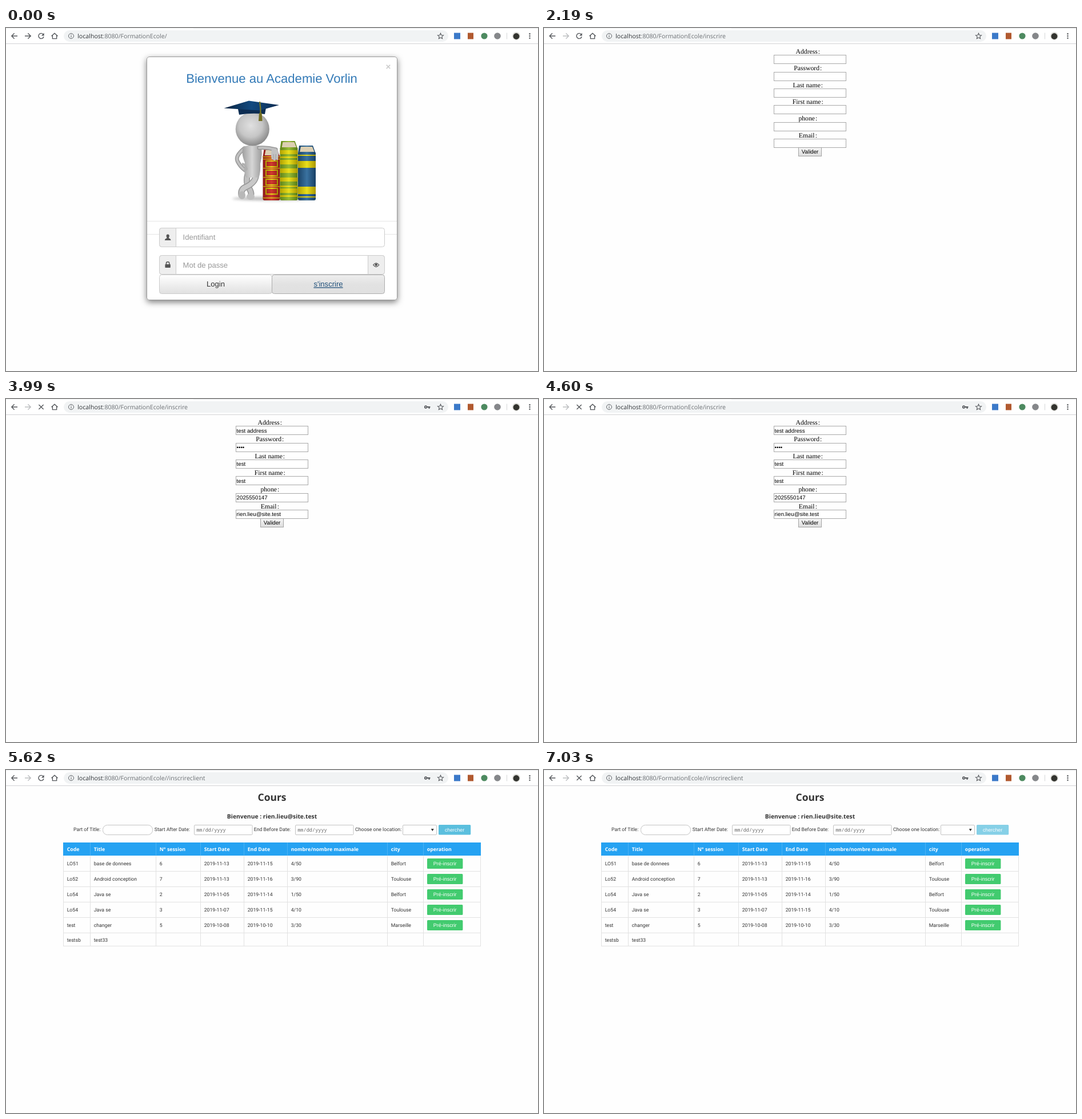
Recreate the animation shown at these times as an HTML page. Size 931 px wide and 601 px high, loop 8 s.

```html
<!DOCTYPE html>
<html lang="fr">
<head>
<meta charset="utf-8">
<title>Inscription</title>
<style>
html, body { margin: 0; width: 100%; height: 100%; overflow: hidden; background: #fefefe; }
svg { display: block; width: 931px; height: 601px; text-rendering: geometricPrecision; }
.ui { font-family: "Open Sans", "Noto Sans", sans-serif; }
.cell { font-family: Roboto, "Open Sans", sans-serif; }
.arial { font-family: "Liberation Sans", Arial, sans-serif; }
.times { font-family: "Liberation Serif", "Times New Roman", serif; }
.mono { font-family: "Noto Sans Mono", monospace; }
.bold { font-weight: 700; }
.mid { text-anchor: middle; }
</style>
</head>
<body>
<svg id="stage" viewBox="0 0 931 601" xmlns="http://www.w3.org/2000/svg"></svg>
<script>
const LOOP = 8000;
const stage = document.getElementById('stage');

const text = (x, y, size, cls, fill, str, extra = '') =>
  `<text x="${x}" y="${y}" font-size="${size}" class="${cls}" fill="${fill}" ${extra}>${str}</text>`;
const rect = (x, y, w, h, fill, stroke = 'none', r = 0, extra = '') =>
  `<rect x="${x}" y="${y}" width="${w}" height="${h}" fill="${fill}" stroke="${stroke}" rx="${r}" ${extra}/>`;
const path = (d, fill, stroke = 'none', width = 1, extra = '') =>
  `<path d="${d}" fill="${fill}" stroke="${stroke}" stroke-width="${width}" ${extra}/>`;
const dot = (x, y, r, fill) => `<circle cx="${x}" cy="${y}" r="${r}" fill="${fill}"/>`;
const oval = (x, y, rx, ry, fill, extra = '') =>
  `<ellipse cx="${x}" cy="${y}" rx="${rx}" ry="${ry}" fill="${fill}" ${extra}/>`;
const group = (id, body) => `<g id="${id}">${body}</g>`;
const gradient = (id, stops, dir = 'x2="0" y2="1"') =>
  `<linearGradient id="${id}" ${dir}>` +
  stops.map((c, i) => `<stop offset="${i / (stops.length - 1)}" stop-color="${c}"/>`).join('') +
  '</linearGradient>';

function defs() {
  const across = 'x2="1" y2="0"';
  return '<defs>' +
    gradient('btn', ['#ffffff', '#e0e0e0']) +
    gradient('btnOn', ['#eeeeee', '#e2e2e2', '#e0e0e0']) +
    gradient('native', ['#f6f6f6', '#dddddd']) +
    gradient('cap', ['#0b2440', '#124a80', '#0b2b50'], across) +
    gradient('gold', ['#b3a200', '#eadf1c', '#a89600'], across) +
    gradient('red', ['#8c1b1b', '#cf3a2e', '#8a1717'], across) +
    gradient('green', ['#5f8419', '#98bd36', '#557a14'], across) +
    gradient('blue', ['#1b4468', '#3a72a0', '#173f64'], across) +
    gradient('limb', ['#a0a0a0', '#d6d6d6', '#9a9a9a'], across) +
    '<radialGradient id="head" cx=".45" cy=".4" r=".62"><stop offset="0" stop-color="#e0e0e0"/>' +
    '<stop offset=".55" stop-color="#c6c6c6"/><stop offset="1" stop-color="#858585"/></radialGradient>' +
    '<filter id="shadow" x="-10%" y="-10%" width="120%" height="120%">' +
    '<feDropShadow dx="0" dy="3.6" stdDeviation="5.2" flood-opacity=".5"/></filter>' +
    '<filter id="soft" x="-20%" y="-100%" width="140%" height="300%"><feGaussianBlur stdDeviation="2"/></filter>' +
    '</defs>';
}

function toolbar() {
  const ink = '#55585c';
  return rect(0, 0, 931, 27, '#fff') +
    rect(0, 0, 328, 1, '#f1f2f3') + rect(328, 0, 603, 1, '#e6e8ea') +
    rect(0, 27, 931, 1, '#d2d3d5') +
    rect(101, 4, 673, 20, '#f1f3f4', 'none', 10) +
    path('M20 14H10M14.6 9.2L9.8 14l4.8 4.8', 'none', ink, 1.4) +
    path('M33 14h10M38.4 9.2l4.8 4.8-4.8 4.8', 'none', ink, 1.4, 'id="forward"') +
    group('reload', path('M65 10.9A4.6 4.6 0 1 0 66 15.2', 'none', ink, 1.4) + path('M66.6 8.8v4.7h-4.7z', ink)) +
    group('stop', path('M57.4 9.9l8.2 8.2M65.6 9.9l-8.2 8.2', 'none', ink, 1.4)) +
    path('M79.5 14.2L85 9.2l5.5 5M81.4 13v5.6h7.2V13', 'none', ink, 1.4) +
    '<circle cx="114" cy="14" r="4.5" fill="none" stroke="#5f6368"/>' +
    path('M114 13.4v3.2M114 11.2v1.2', 'none', '#5f6368', 1.1) +
    '<text x="125.2" y="17.6" font-size="10.6" class="ui" fill="#6b6f73">' +
    '<tspan fill="#303438">localhost</tspan><tspan id="route"></tspan></text>' +
    group('key', path('M734.6 11.2a2.8 2.8 0 1 0 2.6 3.9h2.3v1.8h2v-1.8h.9v-2h-5.2a2.8 2.8 0 0 0-2.6-1.9z', ink) +
      dot(734.6, 14, 1, '#f1f3f4')) +
    path('M760.5 9.2l1.4 3.3 3.6.3-2.7 2.4.8 3.5-3.1-1.9-3.1 1.9.8-3.5-2.7-2.4 3.6-.3z', 'none', ink, 1.1) +
    rect(784, 8.5, 11, 11, '#3b79c9') +
    rect(808, 8.5, 10, 11, '#b1592f') +
    dot(837, 14, 5.6, '#4d8a60') +
    dot(860, 14, 5.8, '#85878a') +
    rect(876, 8.5, 1, 11, '#d4d6d8') +
    dot(893, 14, 7, '#deded9') + dot(893, 14.5, 5.4, '#33342f') +
    [10.2, 14, 17.8].map(y => dot(916.5, y, 1.25, ink)).join('');
}

function book(x, top, w, color, bands) {
  const cover = `url(#${color})`;
  return path(`M${x} ${top + 14}l2 -14h${w - 7}l5 14z`, cover) +
    path(`M${x + 3} ${top + 12}l2 -10h${w - 11}l4 10z`, '#dccfb2') +
    rect(x, top + 11, w, 291 - top, cover, 'none', 3) +
    bands.map(([y, h]) => rect(x, y, w, h, 'url(#gold)')).join('');
}

function graduate() {
  const round = 'stroke-linecap="round" stroke-linejoin="round"';
  const limb = (d, w, c = '#c0c0c0') =>
    path(d, 'none', '#989898', w, round) + path(d, 'none', c, w - 3, round);
  const panels = [233, 249, 265, 281].map(y =>
    rect(455, y, 20, 10, 'none', 'url(#gold)', 0, 'stroke-width="2"') +
    rect(450, y - 4, 30, 1.4, 'url(#gold)')).join('');
  return oval(470, 299, 74, 3.5, '#888', 'opacity=".55" filter="url(#soft)"') +
    limb('M417 211Q401 224 405 233T418 249', 7) +
    limb('M423 256Q419 270 425 280T428 294', 11) +
    limb('M438 254Q438 270 421 278Q410 282 412 293', 11, '#c8c8c8') +
    oval(413, 293, 6, 7, '#b8b8b8') + oval(428, 295.5, 7, 5.5, '#c0c0c0') +
    path('M415 208Q430 203 446 207Q450 220 445 238Q446 254 442 262H420Q415 250 418 236Q411 220 415 208z', 'url(#limb)') +
    path('M413 238q6 1 8 9l-4 4', 'none', '#b0b0b0', 4) +
    dot(431.3, 177, 29.6, 'url(#head)') +
    path('M406 142L408 152Q431 148 453 151L455 140z', '#0d2d52') +
    path('M381.5 140.5L425 127.5L478 135L444 144.5z', 'url(#cap)') +
    path('M444 129q2 12 1.5 22', 'none', '#7d7a22', 2.2) +
    path('M443 149h4.6l1 14h-6.6z', '#746f22') +
    book(449.5, 212, 30, 'red', [[225, 1.4], [297, 1.4]]) + panels +
    book(479.5, 198, 31, 'green', [[214, 7], [225, 3], [231, 8], [246, 8], [262, 7], [276, 3], [281, 8], [293, 3]]) +
    book(511, 206, 31, 'blue', [[222, 2], [233, 12], [278, 13], [295, 2]]) +
    limb('M443 210Q457 209 472 213', 7) +
    path('M465 213q11-3 12 6l-1 12q-2 2-3-1l-2 2q-2 1-3-1l-3-1q-2-8 0-17z', '#c2c2c2') +
    path('M468 221v8M472 221v9', 'none', '#909090', .7);
}

function login() {
  const line = '#ccc', gray = '#999', ink = '#555';
  return rect(246.5, 50.5, 438, 426, '#fff', '#999', 4.4, 'filter="url(#shadow)"') +
    text(669, 73, 15.3, 'arial bold mid', '#ccc', '×') +
    text(315.2, 96, 22.1, 'arial', '#337ab7', 'Bienvenue au Academie Vorlin') +
    graduate() +
    rect(247, 338, 437, 1, '#e5e5e5') + rect(247, 361, 437, 1, '#e5e5e5') +
    rect(268.5, 350.5, 394, 33, '#fff', line, 4) +
    path('M297.5 350.5h-25q-4 0-4 4v25q0 4 4 4h25z', '#eee', line) +
    rect(268.5, 398.5, 394, 33, '#fff', line, 4) +
    path('M297.5 398.5h-25q-4 0-4 4v25q0 4 4 4h25z', '#eee', line) +
    path('M633.5 398.5h25q4 0 4 4v25q0 4-4 4h-25z', '#eee', line) +
    text(309.5, 371.3, 13.1, 'arial', gray, 'Identifiant') +
    text(309.5, 419.5, 13.1, 'arial', gray, 'Mot de passe') +
    path('M283.2 361.6c2 0 2.8 1.4 2.6 3.1-.1 1.5-.9 2-.9 3 0 1 3.6 1.2 3.6 4.2h-10.6c0-3 3.6-3.2 3.6-4.2 0-1-.8-1.5-.9-3-.2-1.7.6-3.1 2.6-3.1z', ink) +
    rect(278.4, 414, 9.4, 6, ink, 'none', .7) +
    path('M280.4 414v-1.5a2.7 2.7 0 0 1 5.4 0v1.5', 'none', ink, 1.5) +
    path('M642.6 415.2q5.1-6.8 10.2 0q-5.1 6.8-10.2 0z', 'none', ink, 1.1) +
    dot(647.7, 414.7, 2.3, ink) +
    rect(268.5, 432.5, 197, 33, 'url(#btn)', line, 4) +
    rect(465.5, 432.5, 197, 33, 'url(#btnOn)', '#adadad', 4) +
    text(367, 453.3, 13.1, 'arial mid', '#333', 'Login') +
    text(564, 453.3, 13.1, 'arial mid', '#23527c', "s'inscrire", 'text-decoration="underline"');
}

function form() {
  const fields = [
    ['Address', 'test address'], ['Password', '••••'], ['Last name', 'test'],
    ['First name', 'test'], ['phone', '2025550147'], ['Email', 'rien.lieu@site.test']
  ];
  const step = 29.3;
  const rows = fields.map(([label], i) =>
    text(461.8, 45 + step * i, 11.7, 'times mid', '#000', `${label}<tspan dx="1">:</tspan>`) +
    rect(402.5, Math.round(47.4 + step * i) + .5, 126, 15, '#fff', '#a9a9a9')).join('');
  const values = fields.map(([, value], i) =>
    text(403.6, 58.8 + step * i, 9.73, 'arial', '#000', value)).join('');
  return rows + rect(445.5, 209.5, 40, 15, 'url(#native)', '#a3a3a3') +
    text(465.6, 220.4, 9.73, 'arial mid', '#000', 'Valider') + group('values', values);
}

function courses() {
  const ink = '#333', edge = '#e2e2e2', box = '#c4c4c4';
  const cols = [100.5, 147.5, 262.5, 340.5, 416.5, 492.5, 667.5, 730.5];
  const heads = ['Code', 'Title', 'N° session', 'Start Date', 'End Date', 'nombre/nombre maximale', 'city', 'operation'];
  const rows = [
    ['LO51', 'base de donnees', '6', '2019-11-13', '2019-11-15', '4/50', 'Belfort'],
    ['Lo52', 'Android conception', '7', '2019-11-13', '2019-11-16', '3/90', 'Toulouse'],
    ['Lo54', 'Java se', '2', '2019-11-05', '2019-11-14', '1/50', 'Belfort'],
    ['Lo54', 'Java se', '3', '2019-11-07', '2019-11-15', '4/10', 'Toulouse'],
    ['test', 'changer', '5', '2019-10-08', '2019-10-10', '3/30', 'Marseille'],
    ['testsb', 'test33']
  ];
  const label = (x, y, str) => text(x, y, 8.7, 'cell', ink, str);
  const cells = rows.map((row, r) => {
    const y = r < 5 ? 167.4 + 27 * r : 300.8;
    const button = r < 5
      ? rect(737, 155 + 27 * r, 62.4, 18, '#42cb6f', 'none', 1.5) +
        text(768.2, 167 + 27 * r, 8.95, 'arial mid', '#fff', 'Pré-inscrir') : '';
    return row.map((s, c) => label(cols[c] + 6.2, y, s)).join('') + button;
  }).join('');
  const ruled = [177.5, 204.5, 231.5, 258.5, 285.5, 308.5].map(y => `M100 ${y}H831`).join('') +
    [...cols, 830.5].map(x => `M${x} 150V308.5`).join('');
  return text(465.5, 54, 17.45, 'ui bold mid', ink, 'Cours') +
    text(465.5, 85.4, 10.35, 'ui bold mid', ink, 'Bienvenue : rien.lieu@site.test') +
    label(118, 107, 'Part of Title:') +
    rect(169.5, 96.5, 87, 17, '#fff', box, 8) +
    label(259.8, 107, 'Start After Date:') +
    label(433.8, 107, 'End Before Date:') +
    [329.5, 506.5].map(x => rect(x, 96.5, 101.5, 17, '#fff', box, 1.5) +
      text(x + 3.7, 108, 8.6, 'mono', '#666', 'mm/dd/yyyy')).join('') +
    label(611, 107, 'Choose one location:') +
    rect(694.5, 96.5, 59, 17, '#fff', box, 1.5) +
    path('M743.8 103h5l-2.5 4.2z', '#333') +
    rect(757, 96, 56.2, 17.6, '#5bbfde', 'none', 1.5, 'id="search"') +
    text(785, 107.6, 8.8, 'arial mid', '#fff', 'chercher') +
    rect(100, 127, 731, 23, '#25a2f2') +
    path(cols.slice(1).map(x => `M${x} 127v23`).join(''), 'none', '#4bb2f5') +
    heads.map((s, c) => text(cols[c] + 6.2, 141.8, 8.8, 'ui bold', '#fff', s)).join('') +
    path(ruled, 'none', edge) + cells;
}

stage.innerHTML = defs() + rect(0, 0, 931, 601, '#fefefe') + toolbar() +
  group('login', login()) + group('form', form()) + group('courses', courses());

const part = id => document.getElementById(id);
const show = (id, on) => part(id).setAttribute('display', on ? 'inline' : 'none');

function update(t) {
  const page = t < 1000 ? 'login' : t < 5010 ? 'form' : 'courses';
  const route = { login: '/', form: '/inscrire', courses: '//inscrireclient' }[page];
  const loading = (t >= 3990 && t < 5010) || t >= 7030;
  for (const id of ['login', 'form', 'courses']) show(id, id === page);
  show('values', t >= 2990);
  show('key', t >= 2990);
  show('stop', loading);
  show('reload', !loading);
  part('route').textContent = ':8080/FormationEcole' + route;
  part('forward').setAttribute('stroke', page === 'login' ? '#55585c' : '#bcbec0');
  part('search').setAttribute('fill', t >= 6020 ? '#86d0e7' : '#5bbfde');
}

const start = performance.now();
function tick() {
  update((performance.now() - start) % LOOP);
  requestAnimationFrame(tick);
}
tick();
</script>
</body>
</html>
```
